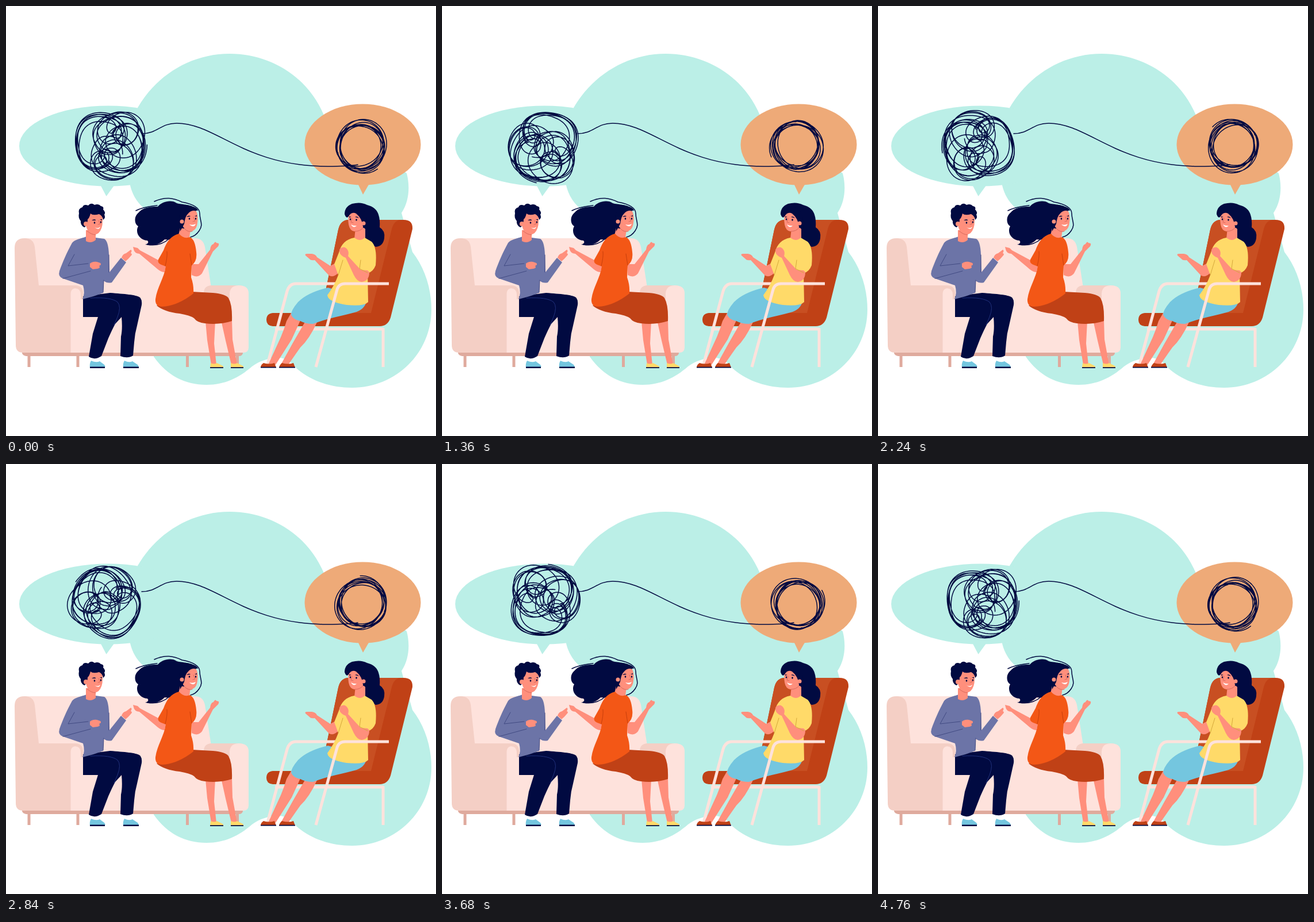
Animation of 748 by 748 pixels, one loop 4800 ms. Source, as an HTML page:

```html
<!DOCTYPE html>
<html lang="en">
<head>
<meta charset="utf-8">
<title>Therapy session</title>
<style>
html, body { margin: 0; width: 100%; height: 100%; overflow: hidden; background: #fff; }
svg { display: block; width: 100vw; height: 100vh; }
.mint { fill: #bbefe7; }
.peach { fill: #eeaa78; }
.light { fill: #fee2dc; }
.pink { fill: #f4cfc5; }
.wood { fill: #dfaa9d; }
.navy { fill: #010a41; }
.skin { fill: #ff8f7c; }
.rust { fill: #c04116; }
.orange { fill: #f35716; }
.yellow { fill: #ffda69; }
.blue { fill: #74c6df; }
.grey { fill: #6c74a7; }
.line { fill: none; stroke: #010a41; stroke-width: 1.5; stroke-linecap: round; stroke-linejoin: round; }
.thin { fill: none; stroke-width: 1; stroke-linecap: round; }
.limb { fill: none; stroke: #ff8f7c; stroke-linecap: round; stroke-linejoin: round; }
.frame { fill: none; stroke: #fee2dc; stroke-width: 5; stroke-linejoin: round; }
</style>
</head>
<body>
<svg viewBox="0 0 748 748" xmlns="http://www.w3.org/2000/svg">
  <!-- backdrop and speech bubbles -->
  <path class="mint" d="M229 177C262 120 322 83 389 83C460 83 525 123 553 190L697 291C702 310 703 337 688 360L707 428C728 455 740 490 740 528C740 604 678 664 602 664C564 664 530 652 505 630C495 617 483 611 473 612C455 613 442 617 428 627C405 647 380 659 349 659C312 659 280 643 257 610V400L240 352C226 340 219 325 216 312Z"/>
  <ellipse class="mint" cx="178" cy="243.5" rx="155" ry="70"/>
  <path class="mint" d="M164 311L174.500 331L189 311Z"/>
  <ellipse class="peach" cx="620.500" cy="241" rx="101" ry="70.500"/>
  <path class="peach" d="M612 309L621 328L632 309Z"/>

  <!-- sofa -->
  <path class="wood" d="M28 600H412V604Q411 609 405 609H35Q29 608 28 604ZM37.500 608H42.500V628H37.500ZM122.500 608H127.500V628H122.500ZM313 608H318V628H313ZM400 608H405V628H400Z"/>
  <path class="light" d="M32 404H328Q343 404 346 419L357 490L400 530V603H100L40 500Z"/>
  <path class="pink" d="M344 500Q344 486 358 486H410V535H344Z"/>
  <path class="light" d="M389 603V500Q390 486 405 486Q422 486 422 500V594Q422 603 412 603Z"/>
  <path class="pink" d="M15 421Q15 404 32 404Q48 404 50 419L57 486H120Q134 486 134 500V520H113V603H30Q17 603 17 590Z"/>
  <path class="light" d="M112.500 603V501Q112.500 492 120 491Q129 491 130 501V510H150V603Z"/>

  <!-- man -->
  <path class="navy" d="M134 505L181 499C206 501 226 502 233 507Q237 511 236 520L228 556Q224 570 223 585L221 608Q212 614 199 609L200 575Q203 562 201 541L190 553Q185 562 178 578L166 609Q154 617 144 610L151 570L160 541H134Z"/>
  <path class="thin" stroke="#21317c" d="M147 508Q183 506 194 515Q201 523 194 541L188 555"/>
  <path class="blue" d="M148 617Q157 621 163 618L171 624Q174 628 171 629H146Q145 622 148 617ZM206 617Q214 621 220 618L229 624Q232 628 230 629H204Q203 622 206 617Z"/>
  <path class="navy" d="M146 627.500H172V630H146ZM204 627.500H231V630H204Z"/>
  <path class="grey" d="M140 401C129 405 120 406 115 412C106 428 98 447 93 461Q90 471 99 474L134 486Q138 499 133 510C147 507 158 503 169 499L170 478Q176 483 184 481L209 446L200 438L180 463L179 432Q178 409 171 405L156 403Z"/>
  <path class="thin" stroke="#424b83" d="M119 432L108 452L143 448M99 474L147 461M179 433L179 463M169 498L170 477"/>
  <path class="skin" d="M139 390H156V407Q148 414 139 409ZM201 438Q203 431 209 430L217 424Q220 425 217 430Q221 431 217 435Q213 440 208 444ZM146 448Q151 444 158 445L164 447Q167 450 162 452Q165 456 159 457L151 458L146 454Z"/>
  <path class="skin" d="M138 364Q146 356 162 359Q169 362 168 374Q168 388 161 395Q153 401 143 391Q138 386 138 364Z"/>
  <path class="thin" stroke="#d96a5d" d="M141 391Q148 398 156 398M161 373L164 379L160 380"/>
  <path class="navy" d="M136 385Q129 381 130 374Q125 368 127 361Q125 352 133 350Q135 344 143 347Q148 341 154 346Q161 343 165 348Q171 349 169 354Q174 359 171 363Q174 368 169 372Q168 365 162 362Q151 365 147 361Q145 369 142 371Q142 379 139 381Q139 384 136 385Z"/>
  <circle class="skin" cx="139" cy="379" r="4"/>
  <path class="navy" d="M149 373Q153 370 156 372L156 373ZM163 371L167 371V373Z"/>
  <ellipse class="navy" cx="154" cy="377" rx="1.300" ry="1.700"/>
  <ellipse class="navy" cx="165" cy="376" rx="1.200" ry="1.700"/>
  <path fill="#fff" d="M154 385Q160 388 164 384Q162 391 154 385Z"/>

  <!-- woman on the sofa -->
  <path class="navy" d="M332 354C323 344 306 346 297 343C288 336 271 340 264 349C248 349 238 351 231 359C222 366 223 379 230 383C224 394 232 407 246 408C249 411 247 414 242 415C258 418 268 414 276 406C288 408 301 403 308 391Z"/>
  <path class="line" d="M226 356Q240 349 263 347M258 340C277 331 292 334 306 341C322 344 337 350 337 361C337 374 344 380 336 391Q330 400 321 402M246 415Q268 419 285 404"/>
  <path class="skin" d="M303 386L321 389L319 403Q309 409 300 399Z"/>
  <path class="skin" d="M305 365Q317 352 331 357Q335 366 333 377Q332 388 325 391Q316 395 308 384Z"/>
  <path class="navy" d="M334 356Q322 354 316 362Q312 365 310 379L303 392L301 364Q310 345 325 349Q333 351 334 356Z"/>
  <circle class="skin" cx="306" cy="375" r="3.500"/>
  <path class="navy" d="M314 367Q318 363 321 366ZM328 366L332 364V366Z"/>
  <ellipse class="navy" cx="319" cy="370" rx="1.300" ry="1.800"/>
  <ellipse class="navy" cx="330" cy="370" rx="1.200" ry="1.700"/>
  <path class="thin" stroke="#d96a5d" d="M326 367L329 374L325 375M311 388Q317 394 324 392"/>
  <path fill="#fff" d="M319 380Q325 382 330 379Q327 387 319 380Z"/>
  <path class="limb" stroke-width="11" d="M277 447L273 455"/>
  <path class="skin" d="M276 463Q270 463 264 458L232 431Q223 430 222 423L221 419L229 421L233 425L278 449Z"/>
  <path class="skin" d="M323 449L335 449L355 424Q356 415 361 414Q364 408 366 412L370 413Q371 417 367 420L360 427L341 465Q334 474 323 468Z"/>
  <path class="skin" d="M347 548H364L362 587L366 624H357L350 581ZM374 546H393L394 580L402 624H392L382 582Z"/>
  <path class="yellow" d="M356 621Q362 624 367 621L377 626Q380 629 376 630H355ZM391 621Q398 624 402 621L412 626Q415 629 411 630H391Z"/>
  <path class="navy" d="M355 628.200H378V630H355ZM391 628.200H413V630H391Z"/>
  <path class="rust" d="M262 521Q275 532 302 535Q320 538 327 543Q333 551 346 552Q371 555 393 548Q394 520 387 508Q382 501 360 499L323 497Z"/>
  <path class="orange" d="M301 396C286 400 279 411 274 425L265 441Q263 447 270 450L278 453C275 473 263 489 260 510Q259 523 272 523C292 522 313 511 326 500Q327 486 322 472L323 451Q333 444 331 428Q329 406 320 402Q309 406 301 396Z"/>
  <path class="thin" stroke="#c83f0c" d="M277 452Q281 437 280 427M323 451L320 431"/>

  <!-- armchair -->
  <path class="rust" d="M578 389Q582 372 596 372H692Q708 372 707 388L669 542Q664 557 650 557H464Q453 556 453 546Q453 535 464 534H548Z"/>
  <path fill="#c84f22" d="M578 389Q582 372 596 372H686Q675 373 671 388L635 534H548Z"/>
  <path class="frame" d="M454 627L489 496Q493 483 504 483H580M468 562H656V628"/>

  <!-- therapist -->
  <path class="skin" d="M496 534H514L512 547L497 580L469 624H456L478 576Q484 562 488 548ZM521 548L541 550Q528 579 512 594L491 624H478L499 586Z"/>
  <path class="rust" d="M448 621Q458 624 467 621L470 629H443Q443 624 448 621ZM480 621Q491 624 500 621L503 629H475Q476 624 480 621Z"/>
  <path class="navy" d="M443 627.800H470V629.500H443ZM475 627.800H503V629.500H475Z"/>
  <path class="blue" d="M560 490Q525 498 508 515Q496 529 496 537Q500 546 512 548Q521 553 534 553C560 543 589 538 610 532Q628 525 627 508Z"/>
  <path class="navy" d="M589 362Q589 349 602 344Q617 340 628 346Q644 350 648 363Q651 372 650 385Q660 391 658 404Q656 418 643 419L622 405L602 366Z"/>
  <path class="skin" d="M608 386H625V406Q616 413 606 405ZM572 448L579 463Q571 473 562 469L537 442Q530 443 528 440L521 434Q519 431 524 431L532 431Q539 432 541 437L564 452Z"/>
  <path class="yellow" d="M606 403C591 406 583 414 579 429L571 449L578 468Q571 487 559 503Q560 515 593 520Q622 523 630 515L629 465Q639 462 643 451Q646 420 636 410L624 403Q616 411 606 403Z"/>
  <path class="skin" d="M629 460L632 463Q632 478 619 480Q611 480 605 468L591 438Q580 434 580 426Q580 421 585 420Q590 418 594 424Q597 428 595 435L617 459Z"/>
  <path class="thin" stroke="#d5a83b" d="M629 464L615 457L617 442M578 468L586 442"/>
  <path class="skin" d="M597 357Q610 353 623 365L622 384Q616 394 606 392Q598 391 596 380Q594 367 597 357Z"/>
  <path class="navy" d="M593 356Q606 344 620 353Q630 361 628 391L621 384Q620 370 609 361Q601 357 596 366Q592 371 589 362Z"/>
  <circle class="skin" cx="622" cy="378" r="3.500"/>
  <path class="navy" d="M597 366L601 367L597 368ZM607 367Q611 365 614 369Z"/>
  <ellipse class="navy" cx="599" cy="371" rx="1.200" ry="1.700"/>
  <ellipse class="navy" cx="609.500" cy="372" rx="1.300" ry="1.800"/>
  <path class="thin" stroke="#d96a5d" d="M602 369L600 376L604 377M607 392Q615 392 620 387"/>
  <path fill="#fff" d="M600 380Q605 383 610 382Q605 388 600 380Z"/>
  <path class="frame" d="M539 628L576 493Q579 483 590 483H666"/>

  <!-- thread -->
  <path class="line" d="M236 222C264 222 268 204 297 204C366 204 414 279 560 279C585 279 600 278 612 276"/>
  <path id="tangle" class="line"/>
  <path id="ring" class="line"/>
</svg>
<script>
const LOOP = 4800, STEP = 40, TAU = Math.PI * 2;
const { sin, cos } = Math;
const tangle = document.getElementById("tangle");
const ring = document.getElementById("ring");

function trace(n, point) {
  let d = "";
  for (let i = 0; i <= n; i++) {
    const [x, y] = point(i / n);
    d += (i ? "L" : "M") + x.toFixed(1) + " " + y.toFixed(1);
  }
  return d;
}

// Loops of changing size that lean on the rim of a rounded box
function tanglePoint(k) {
  const u = k * TAU;
  const a = 25 * u + 0.6 * sin(5 * u);
  const b = 6.3 * u + 0.9 * sin(3.1 * u);
  const swell = 11 * sin(9.7 * u);
  const c = 34 + swell;
  const r = 29 - swell + 4 * sin(13.1 * u + 2);
  const x = c * cos(b) + r * cos(a);
  const y = c * sin(b) + r * sin(a);
  const t = Math.atan2(y, x);
  const s = (63 + 5 * cos(t + 0.3) - 2 * cos(4 * t)) / 65;
  return [x * s, y * s];
}

function ringPoint(k) {
  const a = k * TAU * 8.3 + 1;
  const r = 40 + 3 * sin(1.37 * a);
  return [5.5 * cos(0.43 * a) + r * cos(a), 1 + 4.5 * sin(0.71 * a) + r * sin(a)];
}

function draw(time) {
  const t = Math.floor((time % LOOP) / STEP) * STEP;
  const turn = (t / LOOP * 360).toFixed(2);
  tangle.setAttribute("transform", `translate(178 241.5) rotate(${turn})`);
  ring.setAttribute("transform", `translate(618 243.5) rotate(${turn})`);
}

tangle.setAttribute("d", trace(1500, tanglePoint));
ring.setAttribute("d", trace(700, ringPoint));
draw(0);

const start = performance.now();
function tick() {
  draw(performance.now() - start);
  requestAnimationFrame(tick);
}
requestAnimationFrame(tick);
</script>
</body>
</html>
```
